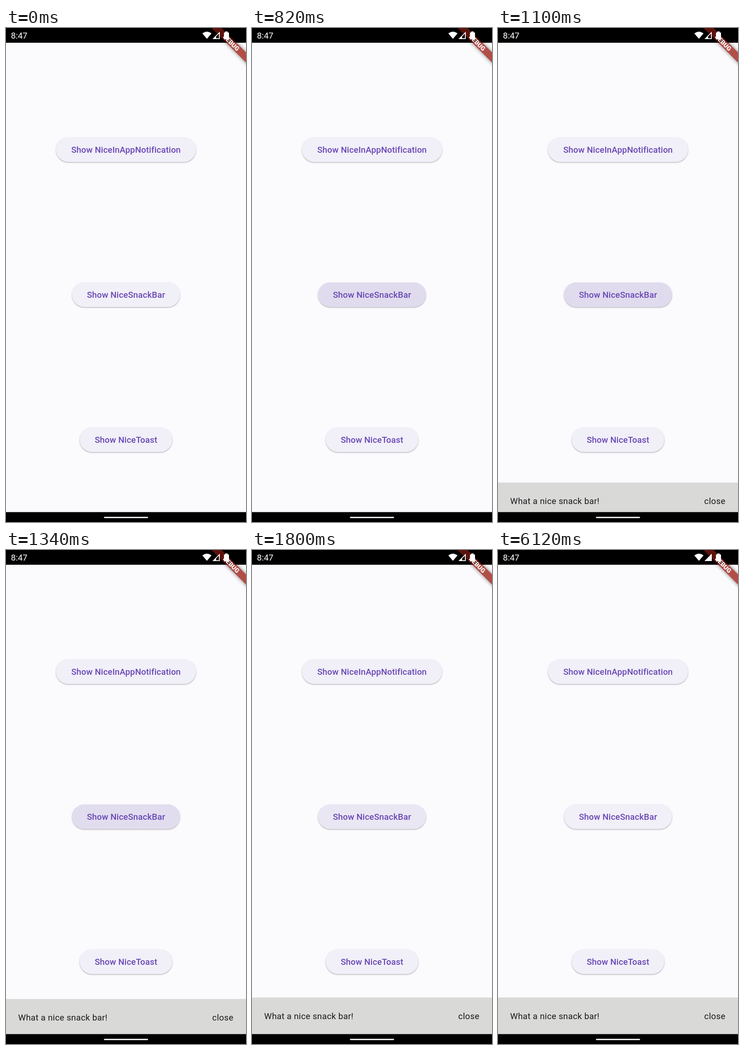
Recreate the animation shown at these times as an HTML page with a canvas. Size 522 by 1073 pixels, loop 8 s.

```html
<!DOCTYPE html>
<html lang="en">
<head>
<meta charset="utf-8">
<title>Snack bar demo</title>
<style>
  html, body { margin: 0; width: 100%; height: 100%; overflow: hidden; background: #fbfafd; }
  canvas { display: block; width: 522px; height: 1073px; }
</style>
</head>
<body>
<canvas id="stage" width="522" height="1073"></canvas>
<script>
const W = 522, H = 1073, LOOP = 8000;
const STATUS_H = 32, NAV_Y = 1051.5;
const FONT = 'Roboto, sans-serif';
const ctx = document.getElementById('stage').getContext('2d');

const BUTTONS = [
  { label: 'Show NiceInAppNotification', x: 108.7, y: 237.7, w: 304.6 },
  { label: 'Show NiceSnackBar', x: 143.6, y: 552.7, w: 234.8, ripple: true },
  { label: 'Show NiceToast', x: 160.3, y: 867.7, w: 201.4 }
];
const BUTTON_H = 53.2;

const clamp = v => Math.min(1, Math.max(0, v));
const mix = (a, b, p) => a + (b - a) * p;
const phase = (t, start, length) => clamp((t - start) / length);

// Cubic Bezier easing, solved by bisection.
function bezier(x1, y1, x2, y2) {
  const at = (a, b, s) => 3 * (1 - s) ** 2 * s * a + 3 * (1 - s) * s * s * b + s ** 3;
  return x => {
    if (x <= 0 || x >= 1) return clamp(x);
    let lo = 0, hi = 1;
    for (let i = 0; i < 24; i++) {
      const mid = (lo + hi) / 2;
      if (at(x1, x2, mid) < x) lo = mid; else hi = mid;
    }
    return at(y1, y2, lo);
  };
}
const easeOutExpo = bezier(0.16, 1, 0.3, 1);
const fastOutSlowIn = bezier(0.4, 0, 0.2, 1);

function rect(x, y, w, h, color) {
  ctx.fillStyle = color;
  ctx.fillRect(x, y, w, h);
}

function pill(x, y, w, h, r, color) {
  ctx.beginPath();
  ctx.roundRect(x, y, w, h, r);
  ctx.fillStyle = color;
  ctx.fill();
}

function poly(points, color) {
  ctx.beginPath();
  points.forEach(([x, y]) => ctx.lineTo(x, y));
  ctx.closePath();
  ctx.fillStyle = color;
  ctx.fill();
}

function text(str, x, y, { size = 18.61, weight = 400, color, align = 'left', spacing = 0 }) {
  ctx.font = `${weight} ${size}px ${FONT}`;
  ctx.letterSpacing = spacing + 'px';
  ctx.textAlign = align;
  ctx.fillStyle = color;
  ctx.fillText(str, x, y);
}

function shadow(color, blur, dy) {
  ctx.shadowColor = color;
  ctx.shadowBlur = blur;
  ctx.shadowOffsetY = dy;
}

function drawRipple(b, t) {
  const p = fastOutSlowIn(phase(t, 565, 460));
  const alpha = 0.125 * phase(t, 565, 80) * (1 - phase(t, 1250, 940));
  if (p <= 0 || alpha <= 0) return;
  const r = 240 * p;
  const cx = mix(282, b.x + b.w / 2, p);
  const cy = mix(602, b.y + BUTTON_H / 2, p);
  const glow = ctx.createRadialGradient(cx, cy, 0, cx, cy, r);
  glow.addColorStop(0, `rgba(103,80,164,${alpha})`);
  glow.addColorStop(0.55, `rgba(103,80,164,${alpha})`);
  glow.addColorStop(1, 'rgba(103,80,164,0)');
  pill(b.x, b.y, b.w, BUTTON_H, BUTTON_H / 2, glow);
}

function drawButton(b, t) {
  ctx.save();
  shadow('rgba(0,0,0,0.3)', 2.6, 1.3);
  pill(b.x, b.y, b.w, BUTTON_H, BUTTON_H / 2, '#f1eff8');
  ctx.restore();
  if (b.ripple) drawRipple(b, t);
  text(b.label, b.x + b.w / 2, b.y + 33.3,
    { weight: 500, color: '#6947b4', align: 'center', spacing: 0.133 });
}

function drawSnackBar(t) {
  const p = easeOutExpo(phase(t, 840, 1100));
  if (p <= 0) return;
  const top = mix(1052, 972, p);
  const style = { color: '#1a1a1c', spacing: 0.33 };
  rect(0, top, W, 80, '#d9d9d8');
  text('What a nice snack bar!', 26.6, top + 46.5, style);
  text('close', 448.6, top + 46.5, style);
}

function drawBanner() {
  const fill = ctx.createLinearGradient(0, STATUS_H - 0.5, 0, STATUS_H + 0.5);
  fill.addColorStop(0, '#5c130d');
  fill.addColorStop(1, '#b14f47');
  ctx.save();
  shadow('rgba(0,0,0,0.5)', 8, 0);
  poly([[437, -10], [459, -10], [532, 63], [532, 85]], fill);
  ctx.restore();

  ctx.save();
  ctx.translate(W, 0);
  ctx.rotate(Math.PI / 4);
  text('DEBUG', 0, 50, { size: 13.56, weight: 900, color: '#fff', align: 'center' });
  ctx.restore();
}

function drawStatusIcons(t) {
  // Wi-Fi fan
  ctx.beginPath();
  ctx.moveTo(437, 23.6);
  ctx.lineTo(427, 11.8);
  ctx.quadraticCurveTo(437, 4.2, 447, 11.8);
  ctx.closePath();
  ctx.fillStyle = '#fff';
  ctx.fill();

  // Signal strength
  poly([[449, 24], [465, 8], [465, 24]], '#fff');
  if (t < 6120) poly([[457, 18.2], [463.2, 12.2], [463.2, 22.2], [457, 22.2]], '#1c0403');

  // Battery
  pill(474, 9.4, 11, 15.4, 1.6, '#fff');
  rect(477, 7.5, 5, 2.5, '#fff');
}

function draw(t) {
  rect(0, 0, W, H, '#fbfafd');
  BUTTONS.forEach(b => drawButton(b, t));
  drawSnackBar(t);
  rect(0, 0, W, STATUS_H, '#000');
  text('8:47', 10.7, 23, { size: 18.6, color: '#fff' });
  drawBanner();
  drawStatusIcons(t);
  rect(0, NAV_Y, W, H - NAV_Y, '#000');
  pill(213, 1061.7, 96, 2.8, 1.4, '#fff');
}

const began = performance.now();
function tick() {
  draw((performance.now() - began) % LOOP);
  requestAnimationFrame(tick);
}
tick();
</script>
</body>
</html>
```
